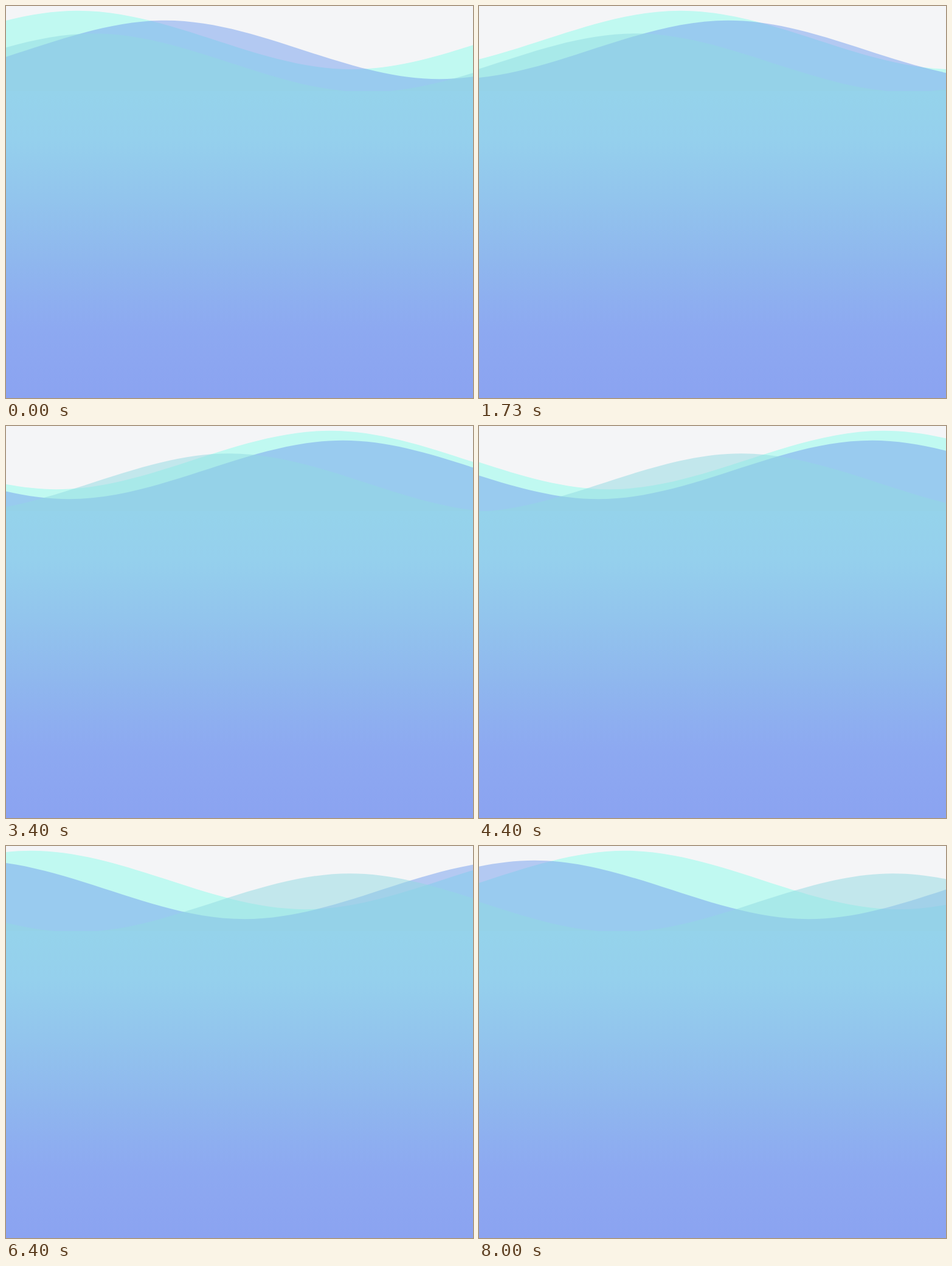
Write an HTML page that moves like this. It is 768 by 645 pixels and loops after 8.07 s.

```html
<!DOCTYPE html>
<html lang="en">
<head>
<meta charset="utf-8">
<title>Waves</title>
<style>
  html, body { margin: 0; width: 100%; height: 100%; overflow: hidden; background: #f4f5f7; }
  svg { position: absolute; left: 0; top: -3px; width: 768px; height: 150px; }
  .sea {
    position: absolute; left: 0; top: 140px; width: 768px; height: 505px;
    background: linear-gradient(#95d3eb, #95d0ed 80px, #92c4ed 180px, #8fb7ee 280px, #8da9f1 390px, #8ba3f1);
  }
</style>
</head>
<body>
<svg viewBox="0 24 150 28" preserveAspectRatio="none">
  <defs>
    <path id="wave" d="M-160 44c30 0 58-18 88-18s58 18 88 18 58-18 88-18 58 18 88 18v44h-352z"/>
  </defs>
  <use href="#wave" fill="#c0f9f1"/>
  <use href="#wave" fill="#749dee" fill-opacity=".5"/>
  <use href="#wave" fill="#91dae2" fill-opacity=".5"/>
</svg>
<div class="sea"></div>
<script>
const LOOP = 8070, FPS = 15;
// period and start offset in seconds, vertical shift in wave units
const waves = [
  { period: 7, start: 5.385, y: 0 },
  { period: 10, start: 9.385, y: 3 },
  { period: 13, start: 10.385, y: 7 },
];
const layers = document.querySelectorAll('use');

const bezier = (a, b, s) => 3 * a * s * (1 - s) ** 2 + 3 * b * s * s * (1 - s) + s ** 3;

// cubic-bezier(.55, .5, .45, .5)
function ease(u) {
  let lo = 0, hi = 1;
  for (let i = 0; i < 30; i++) {
    const mid = (lo + hi) / 2;
    if (bezier(.55, .45, mid) < u) lo = mid; else hi = mid;
  }
  return bezier(.5, .5, lo);
}

function draw(now) {
  // the small bias matches step times rounded to 10 ms
  const t = Math.floor((now % LOOP) * FPS / 1000 + .06) / FPS;
  waves.forEach(({ period, start, y }, i) => {
    const x = 48 - 90 + 175 * ease((t + start) / period % 1);
    layers[i].setAttribute('transform', `translate(${x} ${y})`);
  });
}

const begin = performance.now();
function tick() {
  draw(performance.now() - begin);
  requestAnimationFrame(tick);
}
tick();
</script>
</body>
</html>
```
